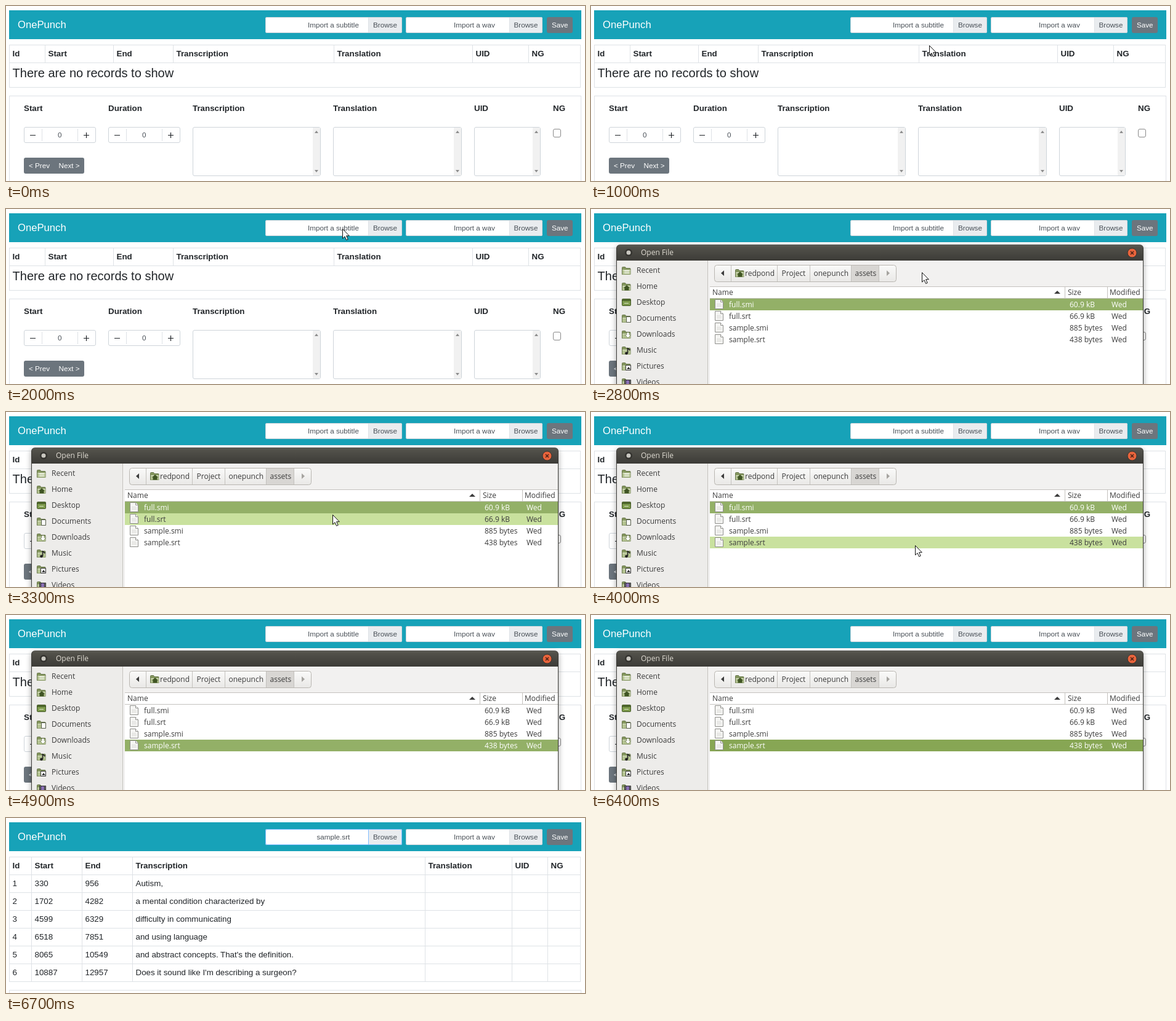
An HTML page for the animation above (8000 ms loop, 940x285 px).

```html
<!DOCTYPE html>
<html lang="en">
<head>
<meta charset="utf-8">
<title>Import a subtitle</title>
<style>
html, body { margin: 0; width: 100%; height: 100%; overflow: hidden; background: #fff; }
svg { display: block; width: 940px; height: 285px; }
text { font: 13.33px "Liberation Sans", Arial, sans-serif; fill: #212529; white-space: pre; }
.b { font-weight: bold; }
.h4 { font-size: 20.05px; }
.brand { font-size: 16.67px; fill: #fff; }
.sm { font-size: 11.67px; fill: #495057; }
.wh { font-size: 11.67px; fill: #fff; }
.line { fill: none; stroke: #dee2e6; shape-rendering: crispEdges; }
.box { fill: #fff; stroke: #ced4da; }
.btn { fill: #6c757d; }
.dlg text { font: 12px "Open Sans", "Noto Sans", sans-serif; fill: #3c3c3c; }
.dlg .title { fill: #dfdbd2; }
.dlg .row text { fill: inherit; }
.row { fill: #3c3c3c; }
.row rect { fill: transparent; }
.sep { fill: none; stroke: #c4c2be; shape-rendering: crispEdges; }

/* 1.25% is one 100 ms tick */
.a { animation: 8s step-end infinite; }
.cursor { animation-name: cursor; }
.dlg { animation-name: dialog; }
.empty { animation-name: empty; }
.loaded { animation-name: loaded; }
.nofile { animation-name: nofile; }
.file { animation-name: file; }
.r1 { animation-name: ink1; }
.r1 rect { animation-name: row1; }
.r2 rect { animation-name: row2; }
.r3 rect { animation-name: row3; }
.r4 { animation-name: ink4; }
.r4 rect { animation-name: row4; }

@keyframes dialog { 0% { opacity: 0 } 26.25% { opacity: .5 } 27.5% { opacity: 1 } 81.25% { opacity: .5 } 82.5%, 100% { opacity: 0 } }
@keyframes empty { 0% { opacity: 1 } 83.75%, 100% { opacity: 0 } }
@keyframes loaded { 0% { opacity: 0 } 83.75%, 100% { opacity: 1 } }
@keyframes nofile { 0% { opacity: 1 } 82.5%, 100% { opacity: 0 } }
@keyframes file { 0% { opacity: 0 } 82.5%, 100% { opacity: 1 } }
@keyframes ink1 { 0% { fill: #fff } 55%, 100% { fill: #3c3c3c } }
@keyframes row1 { 0% { fill: #93b067 } 55%, 100% { fill: transparent } }
@keyframes row2 { 0% { fill: transparent } 41.25% { fill: #c9e19e } 45%, 100% { fill: transparent } }
@keyframes row3 { 0% { fill: transparent } 45% { fill: #c9e19e } 48.75%, 100% { fill: transparent } }
@keyframes ink4 { 0% { fill: #3c3c3c } 55%, 100% { fill: #fff } }
@keyframes row4 { 0% { fill: transparent } 48.75% { fill: #c9e19e } 55% { fill: #93b067 } 80%, 100% { fill: #87a654 } }
@keyframes cursor {
  0% { transform: translate(555px, 300px) }
  3.75% { transform: translate(555px, 276px) }
  5% { transform: translate(553px, 253px) }
  6.25% { transform: translate(550px, 214px) }
  7.5% { transform: translate(547px, 166px) }
  8.75% { transform: translate(545px, 122px) }
  10% { transform: translate(544px, 93px) }
  11.25% { transform: translate(546px, 75px) }
  12.5% { transform: translate(549px, 64px) }
  13.75% { transform: translate(551px, 58px) }
  15% { transform: translate(550px, 50px) }
  16.25% { transform: translate(548px, 41px) }
  17.5% { transform: translate(547px, 35px) }
  18.75% { transform: translate(546px, 32px) }
  32.5% { transform: translate(544px, 43px) }
  33.75% { transform: translate(541px, 73px) }
  35% { transform: translate(537px, 103px) }
  36.25% { transform: translate(534px, 124px) }
  37.5% { transform: translate(532px, 139px) }
  38.75% { transform: translate(531px, 149px) }
  40% { transform: translate(530px, 158px) }
  41.25% { transform: translate(530px, 167px) }
  42.5% { transform: translate(529px, 173px) }
  43.75% { transform: translate(529px, 180px) }
  45% { transform: translate(528px, 188px) }
  46.25% { transform: translate(528px, 195px) }
  47.5% { transform: translate(528px, 202px) }
  48.75% { transform: translate(527px, 210px) }
  50% { transform: translate(526px, 217px) }
  58.75% { transform: translate(530px, 237px) }
  60% { transform: translate(537px, 261px) }
  61.25%, 100% { transform: translate(545px, 300px) }
}
</style>
</head>
<body>
<svg viewBox="0 0 940 285">
  <defs>
    <linearGradient id="bar" x2="0" y2="1"><stop stop-color="#55544d"/><stop offset="1" stop-color="#3c3b37"/></linearGradient>
    <linearGradient id="path" x2="0" y2="1"><stop stop-color="#fafaf9"/><stop offset="1" stop-color="#e9e8e6"/></linearGradient>
    <g id="spin">
      <rect class="box" x=".5" y=".5" width="116" height="25" rx="2.5"/>
      <path class="line" stroke="#ced4da" d="M29.5 3v20M87.5 3v20"/>
      <path d="M10 13.5h9M97 13.5h9M101.5 9v9" fill="none" stroke="#212529" stroke-width="1.2"/>
      <text class="sm" x="55" y="17">0</text>
    </g>
    <g id="scroll">
      <path d="M0 1h12v78h-12z" fill="#f1f1f1"/>
      <path d="M3 10l3-4 3 4zM3 70l3 4 3-4z" fill="#8c8c8c"/>
    </g>
    <g id="folder">
      <path d="M.5 2.5q0-1 1-1h4l1.500 2h6q1 0 1 1v9h-13.500z" fill="#85975f" stroke="#66754a"/>
      <path d="M1 6h13v7.500h-13z" fill="#b4c391"/>
      <path d="M1.500 6.500h12" stroke="#dfe6cd"/>
    </g>
    <g id="page">
      <path d="M.5.500h9l4 4v11h-13z" fill="#f5f5f3" stroke="#8f8f8b"/>
      <path d="M9.500.500v4h4" fill="#fff" stroke="#8f8f8b"/>
      <path d="M3 7.500h7M3 9.500h8M3 11.500h8" stroke="#dededb"/>
    </g>
    <path id="house" d="M8 5l5 4.500h-1.500v4h-7v-4h-1.500z" fill="#3f5423"/>
  </defs>

  <path fill="#17a2b8" d="M5 7h929v47h-929z"/>
  <text class="brand" x="19" y="36">OnePunch</text>
  <rect x="421" y="18" width="222" height="26" rx="3" fill="#fff"/>
  <path d="M588 18h52a3 3 0 0 1 3 3v20a3 3 0 0 1-3 3h-52z" fill="#e9ecef"/>
  <rect x="421.500" y="18.500" width="221" height="25" rx="2.500" fill="none" stroke="#ced4da"/>
  <path class="line" stroke="#ced4da" d="M588.500 19v24"/>
  <text class="sm a nofile" x="490" y="35">Import a subtitle</text>
  <g class="a file">
    <rect x="421.500" y="18.500" width="221" height="25" rx="2.500" fill="none" stroke="#80bdff"/>
    <path d="M588.500 19v24" stroke="#80bdff"/>
    <text class="sm" x="504.500" y="35">sample.srt</text>
  </g>
  <text class="sm" x="596" y="35">Browse</text>
  <rect x="649" y="18" width="222" height="26" rx="3" fill="#fff"/>
  <path d="M817 18h51a3 3 0 0 1 3 3v20a3 3 0 0 1-3 3h-51z" fill="#e9ecef"/>
  <rect x="649.500" y="18.500" width="221" height="25" rx="2.500" fill="none" stroke="#ced4da"/>
  <path class="line" stroke="#ced4da" d="M817.500 19v24"/>
  <text class="sm" x="727" y="35">Import a wav</text>
  <text class="sm" x="824.500" y="35">Browse</text>
  <rect class="btn" x="878" y="18" width="42" height="26" rx="3"/>
  <text class="wh" x="886" y="35">Save</text>

  <g class="a empty">
    <path class="line" d="M5.500 63.500h927v69h-927zM5 92.500h927M63.500 63v29M174.500 63v29M271.500 63v29M532.500 63v29M757.500 63v29M848.500 63v29"/>
    <text class="b" y="82"><tspan x="10.500">Id</tspan><tspan x="68.500">Start</tspan><tspan x="179.500">End</tspan><tspan x="276.500">Transcription</tspan><tspan x="537.500">Translation</tspan><tspan x="762.500">UID</tspan><tspan x="853.500">NG</tspan></text>
    <text class="h4" x="10.500" y="116">There are no records to show</text>

    <path class="line" d="M5.500 290v-143.500h928v143.500"/>
    <text class="b" y="171"><tspan x="29">Start</tspan><tspan x="166">Duration</tspan><tspan x="303">Transcription</tspan><tspan x="531">Translation</tspan><tspan x="760">UID</tspan><tspan x="888">NG</tspan></text>
    <use href="#spin" x="29" y="197"/>
    <use href="#spin" x="166" y="197"/>
    <rect class="box" x="303.500" y="197.500" width="207" height="79" rx="2.500"/>
    <rect class="box" x="531.500" y="197.500" width="208" height="79" rx="2.500"/>
    <rect class="box" x="760.500" y="197.500" width="107" height="79" rx="2.500"/>
    <use href="#scroll" x="498" y="197"/>
    <use href="#scroll" x="727" y="197"/>
    <use href="#scroll" x="855" y="197"/>
    <rect x="888.500" y="200.500" width="12" height="13" rx="2.500" fill="#fff" stroke="#8a8a8a"/>
    <rect class="btn" x="29" y="247" width="98" height="26" rx="3"/>
    <text class="wh" y="264"><tspan x="37">&lt; Prev</tspan><tspan x="85.500">Next &gt;</tspan></text>
  </g>

  <g class="a loaded">
    <path class="line" d="M5.500 63.500h927v203h-927zM5 92.500h927M5 121.500h927M5 150.500h927M5 179.500h927M5 208.500h927M5 237.500h927M41.500 63v203M123.500 63v203M205.500 63v203M680.500 63v203M821.500 63v203M879.500 63v203M5.500 290v-9.500h928v9.500"/>
    <text class="b" y="82"><tspan x="10.500">Id</tspan><tspan x="46.500">Start</tspan><tspan x="128.500">End</tspan><tspan x="210.500">Transcription</tspan><tspan x="685.500">Translation</tspan><tspan x="826.500">UID</tspan><tspan x="884.500">NG</tspan></text>
    <text y="111"><tspan x="10.500">1</tspan><tspan x="46.500">330</tspan><tspan x="128.500">956</tspan><tspan x="210.500">Autism,</tspan></text>
    <text y="140"><tspan x="10.500">2</tspan><tspan x="46.500">1702</tspan><tspan x="128.500">4282</tspan><tspan x="210.500">a mental condition characterized by</tspan></text>
    <text y="169"><tspan x="10.500">3</tspan><tspan x="46.500">4599</tspan><tspan x="128.500">6329</tspan><tspan x="210.500">difficulty in communicating</tspan></text>
    <text y="198"><tspan x="10.500">4</tspan><tspan x="46.500">6518</tspan><tspan x="128.500">7851</tspan><tspan x="210.500">and using language</tspan></text>
    <text y="227"><tspan x="10.500">5</tspan><tspan x="46.500">8065</tspan><tspan x="128.500">10549</tspan><tspan x="210.500">and abstract concepts. That's the definition.</tspan></text>
    <text y="256"><tspan x="10.500">6</tspan><tspan x="46.500">10887</tspan><tspan x="128.500">12957</tspan><tspan x="210.500">Does it sound like I'm describing a surgeon?</tspan></text>
  </g>

  <g class="a dlg">
    <rect x="41" y="58" width="856" height="300" rx="6" fill="#3c3b37" style="filter: drop-shadow(0 3px 5px rgba(0,0,0,.35))"/>
    <path d="M42 84v-20q0-5 5-5h844q5 0 5 5v20z" fill="url(#bar)"/>
    <path d="M46 59.500h846" stroke="#68675f"/>
    <circle cx="61" cy="71" r="6" fill="#33322e"/>
    <circle cx="61" cy="71" r="3.500" fill="#c9c7c0"/>
    <text class="title" x="81" y="75">Open File</text>
    <circle cx="878.500" cy="71.500" r="7.500" fill="#e9643c" stroke="#33322e"/>
    <path d="M876 69l5 5M881 69l-5 5" stroke="#4a2015" stroke-width="1.500"/>

    <path d="M42 84h854v210h-854z" fill="#f2f1f0"/>
    <path d="M42 84h147v210h-147z" fill="#edecea"/>
    <path class="sep" stroke="#d3d1ce" d="M189.500 84v210"/>

    <use href="#folder" x="50" y="93"/>
    <path d="M54 101h8M54 104h8" stroke="#f4f6ee" stroke-width="1.500"/>
    <text x="74" y="104">Recent</text>
    <use href="#folder" x="50" y="119"/><use href="#house" x="50" y="119"/>
    <text x="74" y="130">Home</text>
    <rect x="50.500" y="146.500" width="14" height="11" rx="1" fill="#7d9a4c" stroke="#3f5423"/>
    <path d="M51 148.500h13" stroke="#3f5423" stroke-width="2"/><path d="M54 153.500h7" stroke="#dfe9cb"/>
    <text x="74" y="156">Desktop</text>
    <use href="#folder" x="50" y="171"/>
    <path d="M57.500 175.500h7v9h-7z" fill="#fff" stroke="#555b48"/>
    <text x="74" y="182">Documents</text>
    <use href="#folder" x="50" y="197"/>
    <path d="M58 201h4v4h3l-5 5-5-5h3z" fill="#fff" stroke="#66754a" stroke-width=".7"/>
    <text x="74" y="208">Downloads</text>
    <use href="#folder" x="50" y="223"/>
    <path d="M59.500 235v-8l4 3" fill="none" stroke="#222" stroke-width="1.600"/><circle cx="57.500" cy="235" r="2.300" fill="#222"/>
    <text x="74" y="234">Music</text>
    <use href="#folder" x="50" y="249"/>
    <path d="M56.500 254.500h8v8h-8z" fill="#fff" stroke="#333"/><path d="M58 261l3-4 3 4z" fill="#333"/>
    <text x="74" y="260">Pictures</text>
    <use href="#folder" x="50" y="275"/>
    <path d="M54 278h11v10h-11z" fill="#222"/><path d="M57 279h5v9h-5z" fill="#8a70b5"/>
    <path d="M55.500 279v9M63.500 279v9" stroke="#fff" stroke-dasharray="1 1"/>
    <text x="74" y="286">Videos</text>

    <rect x="200.500" y="91.500" width="295" height="27" rx="4" fill="url(#path)" stroke="#b9b6b1"/>
    <path d="M423 92h44v26h-44z" fill="#d8d6d3"/>
    <path class="sep" d="M227.500 92v26M302.500 92v26M355.500 92v26M422.500 92v26M467.500 92v26"/>
    <path d="M216 100v9l-5-4.500z" fill="#3c3c3c"/>
    <path d="M480 100v9l5-4.500z" fill="#a5a39f"/>
    <use href="#folder" x="234" y="97"/><use href="#house" x="234" y="97"/>
    <text y="109"><tspan x="250">redpond</tspan><tspan x="309.500">Project</tspan><tspan x="361.500">onepunch</tspan><tspan x="428.500">assets</tspan></text>

    <path d="M193 126h703v168h-703z" fill="#fff"/>
    <path class="sep" stroke="#dcdad7" d="M193 126.500h703M193 145.500h703M769.500 127v18M838.500 127v18"/>
    <text y="140"><tspan x="197">Name</tspan><tspan x="774">Size</tspan><tspan x="842">Modified</tspan></text>
    <path d="M752 138h10l-5-5z" fill="#3c3c3c"/>

    <g class="row a r1">
      <rect class="a" x="193" y="146" width="703" height="19"/><use href="#page" x="201" y="147"/>
      <text y="160"><tspan x="224">full.smi</tspan><tspan x="777">60.9 kB</tspan><tspan x="845">Wed</tspan></text>
    </g>
    <g class="row r2">
      <rect class="a" x="193" y="165" width="703" height="19"/><use href="#page" x="201" y="166"/>
      <text y="179"><tspan x="224">full.srt</tspan><tspan x="777">66.9 kB</tspan><tspan x="845">Wed</tspan></text>
    </g>
    <g class="row r3">
      <rect class="a" x="193" y="184" width="703" height="19"/><use href="#page" x="201" y="185"/>
      <text y="198"><tspan x="224">sample.smi</tspan><tspan x="777">885 bytes</tspan><tspan x="845">Wed</tspan></text>
    </g>
    <g class="row a r4">
      <rect class="a" x="193" y="203" width="703" height="19"/><use href="#page" x="201" y="204"/>
      <text y="217"><tspan x="224">sample.srt</tspan><tspan x="777">438 bytes</tspan><tspan x="845">Wed</tspan></text>
    </g>
  </g>

  <path class="a cursor" d="M.5.500v15.500l3.500-3.300 2.600 5.800 2.600-1.200-2.600-5.600h4.700z" fill="#fff" stroke="#111"/>
</svg>
</body>
</html>
```
